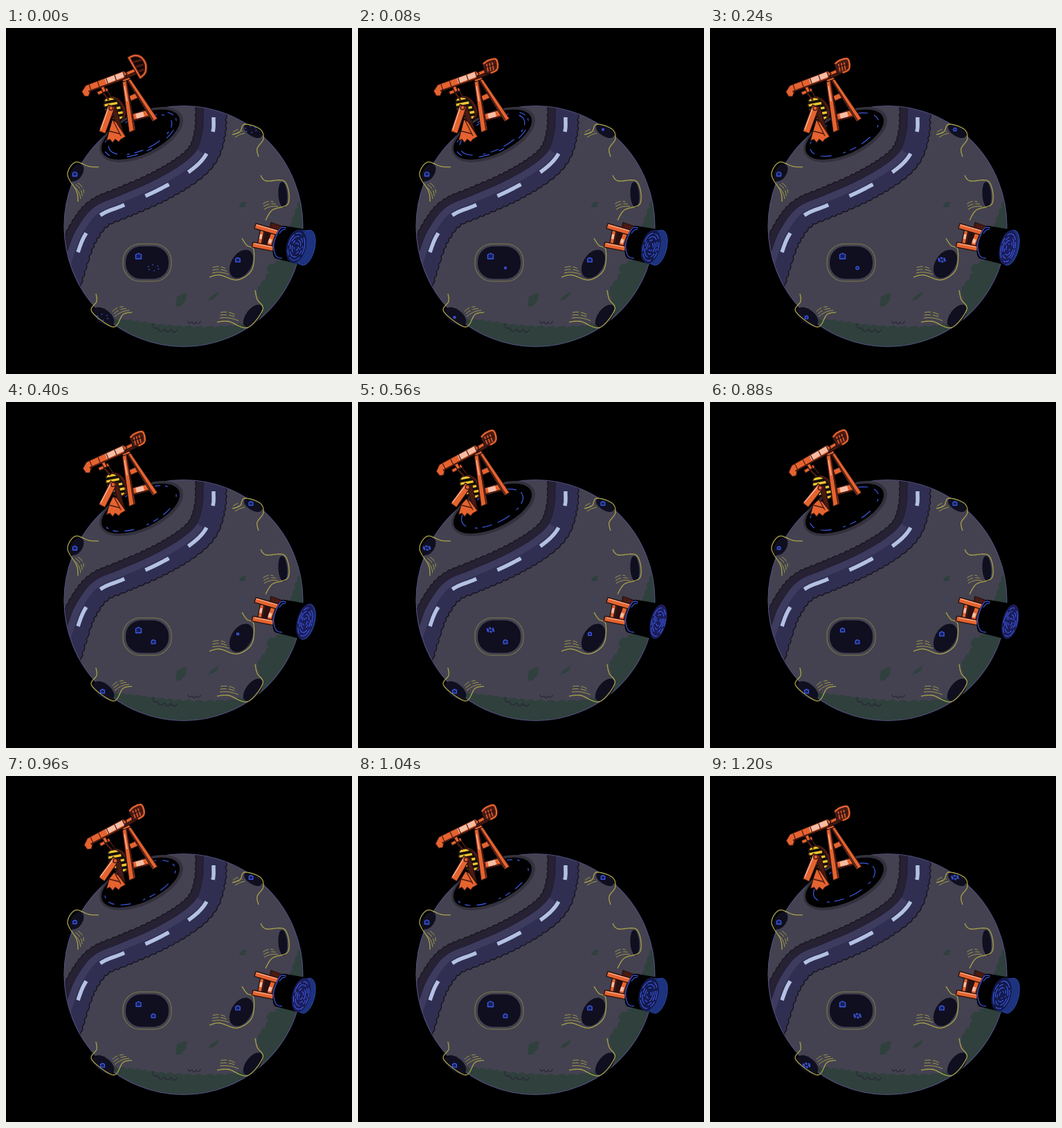
Animation of 500x500 px, one loop 1280 ms. Source, as an HTML page with a canvas:

```html
<!DOCTYPE html>
<html lang="en">
<head>
<meta charset="utf-8">
<title>Oil planet</title>
<style>
html, body { margin: 0; width: 100%; height: 100%; overflow: hidden; background: #000; }
canvas { display: block; width: 100vmin; height: 100vmin; }
</style>
</head>
<body>
<canvas id="stage" width="500" height="500"></canvas>
<script>
const ctx = document.getElementById('stage').getContext('2d');
const LOOP = 1280, STEP = 80, STEPS = LOOP / STEP;
const TAU = Math.PI * 2, RAD = Math.PI / 180;
const C = {
  ground: '#444250', rim: '#33313d', green: '#2f403d', edge: '#4d4d78',
  ditch: '#262133', road: '#302f52', lane: '#3d3b5e', dash: '#b3c1e2',
  hole: '#100f20', yellow: '#a9a249', olive: '#6b6a4c', blue: '#3d5be6',
  orange: '#e5632f', pale: '#f6bda4', brown: '#4a1a13', line: '#25100e', stripe: '#f0c62e'
};
const lerp = (a, b, u) => a + (b - a) * u;

// Catmull-Rom samples through flat x, y pairs
function sample(p) {
  const n = p.length / 2, out = [];
  const at = (i, c) => p[2 * Math.max(0, Math.min(n - 1, i)) + c];
  const spline = (i, c, t) => {
    const a = at(i - 1, c), b = at(i, c), d = at(i + 1, c), e = at(i + 2, c);
    return b + t * (d - a + t * (2 * a - 5 * b + 4 * d - e + t * (3 * b - a - 3 * d + e))) / 2;
  };
  for (let i = 0; i < n - 1; i++)
    for (let s = 0; s < 12; s++) out.push([spline(i, 0, s / 12), spline(i, 1, s / 12)]);
  out.push([at(n - 1, 0), at(n - 1, 1)]);
  return out;
}
function trace(points, path = new Path2D()) {
  points.forEach(q => path.lineTo(q[0], q[1]));
  return path;
}
// shift a sampled line sideways
function offset(pts, d) {
  return pts.map(([x, y], i) => {
    const a = pts[Math.max(0, i - 3)], b = pts[Math.min(pts.length - 1, i + 3)];
    const dx = b[0] - a[0], dy = b[1] - a[1], len = Math.hypot(dx, dy);
    return [x + dy / len * d, y - dx / len * d];
  });
}
function scallop(pts, step, amp) {
  const path = new Path2D();
  let a = pts[0];
  path.moveTo(a[0], a[1]);
  for (const b of pts) {
    const dx = b[0] - a[0], dy = b[1] - a[1], d = Math.hypot(dx, dy);
    if (d < step) continue;
    path.quadraticCurveTo((a[0] + b[0]) / 2 + dy / d * amp, (a[1] + b[1]) / 2 - dx / d * amp, b[0], b[1]);
    a = b;
  }
  return path;
}
function fill(path, color) { ctx.fillStyle = color; ctx.fill(path); }
function stroke(path, color, w = 1) { ctx.strokeStyle = color; ctx.lineWidth = w; ctx.stroke(path); }
function curve(color, w, ...p) { stroke(trace(sample(p)), color, w); }
function poly(color, border, ...p) {
  const path = new Path2D();
  for (let i = 0; i < p.length; i += 2) path.lineTo(p[i], p[i + 1]);
  path.closePath();
  fill(path, color);
  if (border) stroke(path, border, 1.3);
}
function oval(x, y, rx, ry, deg = 0) {
  const path = new Path2D();
  path.ellipse(x, y, rx, ry, deg * RAD, 0, TAU);
  return path;
}
function bar(x1, y1, x2, y2, w, color = C.orange, border = C.line) {
  const d = Math.hypot(x2 - x1, y2 - y1), nx = (y1 - y2) / d * w / 2, ny = (x2 - x1) / d * w / 2;
  poly(color, border, x1 + nx, y1 + ny, x2 + nx, y2 + ny, x2 - nx, y2 - ny, x1 - nx, y1 - ny);
}
function line(x1, y1, x2, y2, color, w = 1.2) {
  stroke(trace([[x1, y1], [x2, y2]]), color, w);
}
function dashed(path, color, w, pattern, shift = 0) {
  ctx.setLineDash(pattern);
  ctx.lineDashOffset = shift;
  stroke(path, color, w);
  ctx.setLineDash([]);
}

const planet = oval(256.5, 286.5, 172.5, 174);
const middle = sample([301, 105, 300, 129, 299, 150, 289, 183, 264, 208, 220, 234,
  170, 256, 136, 271, 115, 298, 104, 324, 88, 376]);
const roadTop = offset(middle, -15), roadLow = offset(middle, 17), ditchTop = offset(middle, -25);

function band(edge, other) {
  const path = trace([...other].reverse(), new Path2D(edge));
  path.closePath();
  return path;
}
function drawRoad() {
  const upper = scallop(ditchTop, 7, -3.5), lower = scallop(roadLow, 8, 4);
  const road = band(lower, roadTop);
  fill(band(upper, roadLow), C.ditch);
  fill(road, C.road);
  ctx.save();
  ctx.clip(road);
  stroke(trace(roadTop.slice(36)), C.lane, 21);
  ctx.restore();
  stroke(upper, '#17141f', 1.2);
  stroke(lower, '#17141f', 1.4);
  stroke(trace(roadTop), '#211e35');
  dashed(trace(middle.slice(12, -12)), C.dash, 5.5, [38, 33], 17);
}

function drawGround() {
  fill(planet, C.ground);
  ctx.save();
  ctx.clip(planet);
  const shore = scallop(sample([432, 230, 413, 284, 398, 334, 376, 346, 380, 356, 364, 380,
    370, 404, 335, 430, 250, 432, 180, 424, 138, 422]), 9, -5);
  shore.lineTo(150, 480);
  shore.lineTo(440, 480);
  fill(shore, C.green);
  poly(C.green, null, 247, 388, 261, 382, 260, 393, 253, 402, 245, 403);
  poly(C.green, null, 291, 395, 297, 387, 308, 381, 304, 389);
  poly(C.green, null, 336, 259, 341, 252, 347, 251, 345, 259);
  stroke(scallop(sample([213, 427, 222, 434, 254, 436]), 8, -8), '#292833', 1.3);
  stroke(scallop(sample([263, 423, 274, 425, 285, 422]), 6, -6), '#292833', 1.3);
  drawRoad();
  ctx.restore();
  stroke(planet, C.edge, 1.2);
  fill(oval(195.5, 154, 65, 32, -25), C.rim);
  fill(oval(194.5, 154, 61, 28, -25), '#000');
}

const lip = (...p) => curve(C.yellow, 1.3, ...p);
// three fading creases beside a lip
function creases(x, y, dx, dy, bend) {
  const len = Math.hypot(dx, dy), nx = dy / len, ny = -dx / len;
  for (let i = 0; i < 3; i++) {
    const px = x + nx * i * 4, py = y + ny * i * 4, s = 1 - i * 0.12;
    const path = new Path2D();
    path.moveTo(px, py);
    path.quadraticCurveTo(px + dx * s / 2 + nx * bend, py + dy * s / 2 + ny * bend, px + dx * s, py + dy * s);
    dashed(path, C.yellow, 0.9, i ? [9, 3] : []);
  }
}
const hole = (...e) => fill(oval(...e), C.hole);
function blob(w, h, r) {
  const path = new Path2D();
  path.roundRect(204 - w, 339 - h, w * 2, h * 2, r);
  return path;
}
function drawCraters() {
  hole(102, 209, 14, 8.5, -57);
  lip(134, 201, 120, 200, 100, 194, 89, 212, 102, 236, 104, 251);
  creases(97, 228, 11, 19, 5);

  hole(357, 149, 14.5, 7.5, 32);
  lip(327, 154, 338, 150, 345, 139, 367, 146, 372, 160, 363, 174, 365, 186);
  creases(331, 158, 14, -6, 2);

  hole(400, 241, 6.5, 18.5, -4);
  lip(368, 213, 376, 221, 403, 222, 408, 253, 385, 263, 375, 278);
  creases(373, 262, 20, -4, 4);

  hole(340, 341, 22.5, 14.5, -58);
  lip(341, 304, 348, 314, 358, 321, 355, 350, 334, 364, 309, 357, 294, 360);
  creases(298, 354, 24, 2, 4);

  hole(141, 417, 18, 10, 38);
  lip(130, 384, 131, 395, 124, 410, 155, 432, 169, 414, 182, 411);
  creases(157, 417, 21, -9, 4);

  hole(357, 416, 19, 10, -52);
  lip(360, 379, 363, 392, 371, 407, 349, 433, 322, 424, 305, 425);
  creases(309, 419, 27, 4, 4);

  fill(blob(31, 23.5, 22), C.hole);
  stroke(blob(35, 27, 25), C.olive, 1.5);
}

function bubble(x, y, size, pop, k) {
  const age = (k - pop + STEPS) % STEPS;
  if (age < 2) {
    const r = 4.5 + age * 3.5;
    for (let i = 0; i < 6; i++) {
      const a = i * TAU / 6 + 0.4, px = x + Math.cos(a) * r, py = y + Math.sin(a) * r * 0.55;
      if (age) line(px - 0.8, py, px + 0.8, py, C.blue, 1.4);
      else stroke(oval(px, py, 1.3, 0.9, 40), C.blue, 1.1);
    }
    return;
  }
  const r = size * Math.min(1, 0.45 + (age - 2) * 0.14);
  poly('#14205c', C.blue, x - r, y - r / 2, x, y - r, x + r, y - r / 2, x + r, y + r, x - r, y + r);
}
function drawBubbles(k) {
  bubble(191.5, 329.5, 4, 7, k);
  bubble(213, 346.5, 2.8, 15, k);
  bubble(99.5, 211, 3, 7, k);
  bubble(354, 146.5, 2.8, 15, k);
  bubble(335, 335, 3.2, 3, k);
  bubble(139.5, 418, 2.9, 15, k);
}

function drawRipples(k) {
  const ring = (s, pattern, shift) =>
    dashed(oval(194, 154, 60 * s, 27 * s, -25), C.blue, 1.2, pattern, shift);
  const p = (k + 1) % 8;
  ring(0.8 + p * 0.023, [14 - p, 7, 4, 13 + p, 20 - p, 9], p * 2);
  if (p === 1 || p === 2) ring(0.94, [9, 14, 16, 25], 5);
}

function drawHead(k) {
  if (k === 0) {
    const head = trace(sample([178, 43, 187, 40, 196, 43, 202, 53, 201, 65, 194, 72]));
    head.closePath();
    fill(head, '#120706');
    for (let i = 0; i < 3; i++) line(182 + i * 4, 50 + i * 7, 198 + i, 46 + i * 7, C.brown, 3);
    stroke(head, C.line, 5);
    stroke(head, C.brown, 4);
    stroke(head, C.orange, 2.2);
    return;
  }
  poly(C.brown, C.line, 180, 51, 187, 46, 199, 44, 203, 53, 201, 62, 192, 66, 184, 66);
  curve(C.orange, 2.4, 181, 52, 188, 47, 199, 45, 202, 54, 200, 61, 192, 65);
  for (let i = 0; i < 3; i++) line(186 + i * 4, 52 - i, 188 + i * 4, 63 - i, C.orange, 1.5);
  line(184, 57, 199, 53, C.line);
}

function drawBeam(k, u) {
  ctx.save();
  ctx.translate(172, 70);
  ctx.rotate(-11 * RAD * u);
  ctx.translate(-172, -70);
  line(138, 90, 148, 104, C.brown, 2.5);
  line(145, 88, 152, 101, C.brown, 1.5);
  bar(132, 94, 147, 88.5, 5);
  bar(138, 82, 142, 92, 5);
  bar(170, 70, 187, 63.5, 8, C.brown);
  bar(170, 68, 187, 61, 5);
  drawHead(k);
  poly(C.orange, C.line, 115, 82, 170, 62, 175, 66, 170, 74, 122, 90, 119, 98, 113, 98, 109, 91);
  poly(C.pale, null, 143, 73, 169, 63.5, 171, 70.5, 145, 80);
  line(119, 91, 171, 73, C.brown, 2);
  for (let i = 0; i < 5; i++) {
    const x = 120 + i * 12.3, y = 81 - i * 4.4;
    line(x, y, x + 2.5, y + 8, C.brown);
  }
  ctx.restore();
}

function drawWheel(u) {
  ctx.save();
  ctx.translate(lerp(155, 163, u), lerp(116, 125, u));
  ctx.rotate(56 * RAD);
  const disc = oval(0, 0, 19, 11.5);
  fill(oval(1, -3, 19, 12), C.brown);
  fill(disc, '#15100c');
  ctx.clip(disc);
  for (let i = -2; i < 3; i++) bar(i * 8 - 5, 12, i * 8 + 4, -9, 3.4, C.stripe, null);
  stroke(disc, C.line, 2);
  ctx.restore();
}

function drawCrank(u) {
  const tx = lerp(152, 161, u), ty = lerp(112, 122, u), fx = 139 - u, fy = 151 - 2 * u;
  bar(tx + 2, ty, 168 + 2 * u, 158, 7, C.brown);
  bar(fx, fy, tx, ty, 10);
  line(fx - 2, fy - 4, tx - 4, ty + 1, C.pale, 1.3);
  stroke(oval(tx - 1, ty + 3, 3, 3), C.brown, 1.5);
  const bx = 153 + 4 * u, by = 132 + 10 * u;
  poly(C.orange, C.line, 145, 163, 149, 148, bx, by, bx + 6, by + 3, 173, 157,
    166, 161, 163, 165, 158, 161, 154, 166, 150, 161);
  line(149, 149, 165, 153, C.brown, 1.3);
  line(bx + 2, by + 2, 166, 156, C.brown, 1.3);
}

function drawTower() {
  poly('#000', null, 171, 78, 177, 76, 183, 116, 181, 143);
  bar(179, 102, 190, 97, 8);
  bar(182, 129, 208, 122, 9);
  bar(188, 127.5, 199, 124.5, 7, C.pale, null);
  line(182, 134, 210, 127, C.brown, 2);
  poly(C.orange, C.line, 174, 74, 179, 72, 219, 131, 212, 135);
  line(176, 75, 213, 133, C.brown, 1.5);
  poly(C.orange, C.line, 168, 77, 174, 75, 187, 147, 178, 151);
  line(174, 78, 185, 147, C.brown, 1.6);
  line(171, 84, 175, 106, C.pale, 1.3);
  poly(C.orange, C.line, 167, 71, 177, 68, 180, 74, 169, 78);
}

function drawLadder() {
  poly(C.brown, C.line, 383, 281, 400, 287, 394, 298, 381, 291);
  poly('#2b1011', null, 374, 294, 386, 297, 382, 318, 370, 314);
  bar(371, 289, 366, 314, 5.5);
  bar(387, 294, 379, 318, 7);
  bar(369, 298, 367.5, 305, 3.5, C.pale, null);
  bar(382.5, 305, 380.5, 311, 4.5, C.pale, null);
  bar(360, 286, 394, 296, 7.5);
  bar(356, 313, 387, 319, 7.5);
  line(362, 284.5, 392, 293, C.pale);
  line(359, 311.5, 384, 316.5, C.pale);
}

// empty share of the tank
function emptiness(k) {
  if (k < 3) return 1 - k * 0.26;
  if (k < 7) return (7 - k) * 0.055;
  if (k < 12) return 0;
  return k === 12 ? 0.5 : 0.95 - (k - 13) * 0.035;
}
function tube(x1, y1, rx1, ry1, x2, y2, rx2, ry2, color) {
  ctx.fillStyle = color;
  ctx.beginPath();
  ctx.ellipse(x1, y1, rx1, ry1, 14 * RAD, TAU / 4, TAU * 3 / 4);
  ctx.ellipse(x2, y2, rx2, ry2, 14 * RAD, -TAU / 4, TAU / 4);
  ctx.fill();
}
function drawTank(k) {
  const e = emptiness(k), x = lerp(434, 419.5, e), y = lerp(317.5, 315.5, e);
  const rx = lerp(11.5, 14, e), ry = lerp(25.5, 24.5, e);
  const end = [434, 317.5, 12, 26];
  tube(396, 309.5, 9, 24.5, ...end, '#000');
  if (e > 0.05) {
    tube(x, y, rx, ry, ...end, '#1b2c72');
    fill(oval(...end, 14), '#1d3380');
    stroke(oval(...end, 14), '#2a469f');
  }
  fill(oval(x, y, rx, ry, 14), e > 0.5 ? '#131a4c' : '#1b1d5a');
  for (let i = 0; i < 4; i++) {
    const s = 0.22 + i * 0.2;
    dashed(oval(x, y + 0.5, rx * s, ry * s, 14), C.blue, 1.1,
      [6 + i * 4, 3, 3 + i * 2, 5], i * 7 - k * (3 + i));
  }
  curve(C.blue, 1.2, 405, 289, 396, 290, 387, 312, 390, 329, 399, 333);
  curve(C.blue, 1.1, 404, 291, 399, 292, 395, 297);
}

function draw(k) {
  const u = (1 - Math.cos(TAU * (k - 1.4) / STEPS)) / 2;
  ctx.fillStyle = '#000';
  ctx.fillRect(0, 0, 500, 500);
  ctx.lineJoin = 'round';
  drawGround();
  drawCraters();
  drawBubbles(k);
  drawRipples(k);
  drawWheel(u);
  drawCrank(u);
  drawTower();
  drawBeam(k, u);
  drawLadder();
  drawTank(k);
}

function tick() {
  draw(Math.floor(performance.now() % LOOP / STEP));
  requestAnimationFrame(tick);
}
tick();
</script>
</body>
</html>
```
